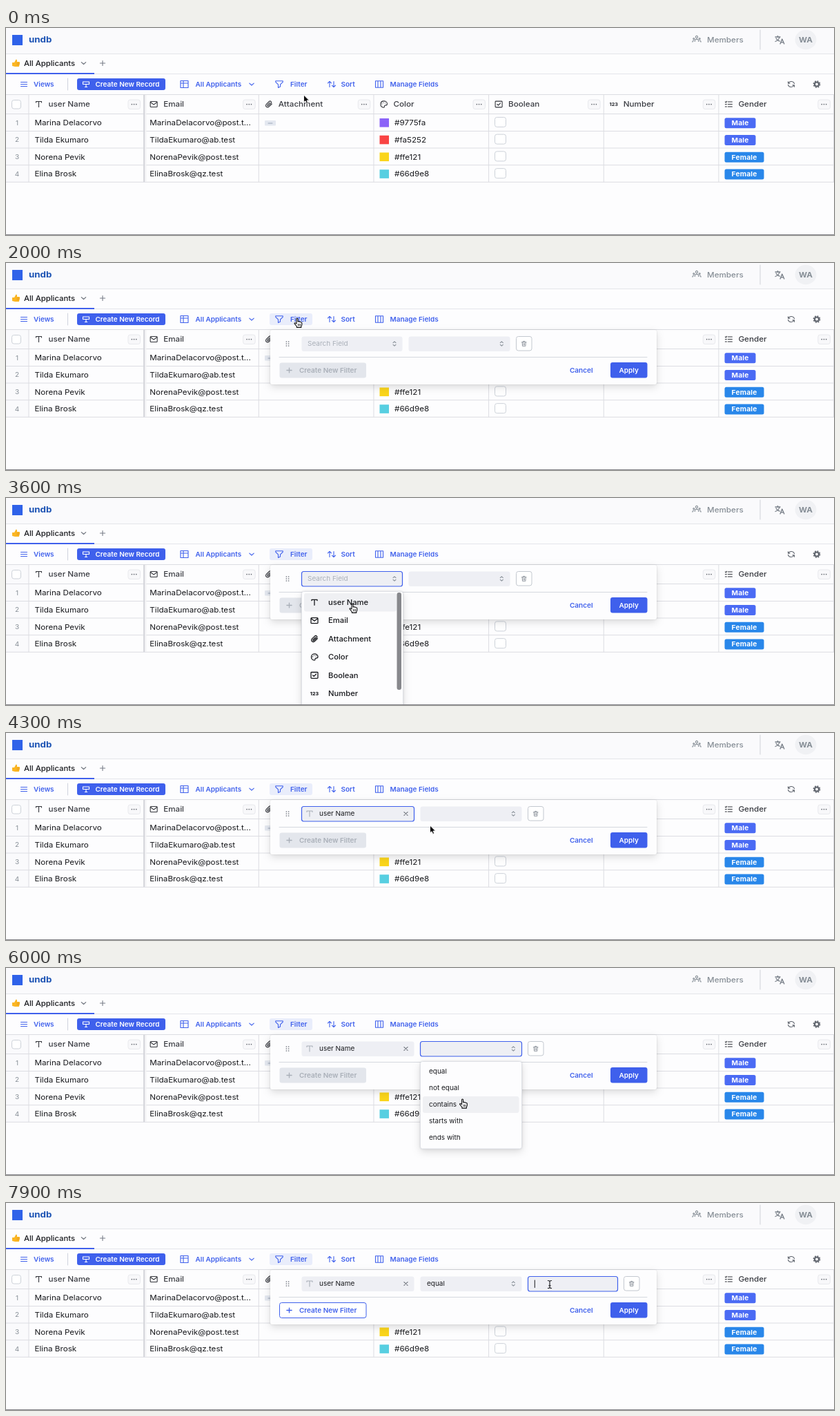
These frames come from a looping animation (1200 by 300 pixels, 8 s). An HTML page:

```html
<!DOCTYPE html>
<html lang="en">
<head>
<meta charset="utf-8">
<title>Filtering a table</title>
<style>
  html, body { margin: 0; width: 100%; height: 100%; overflow: hidden; background: #fdfdfe; }
  svg { display: block; width: 1200px; height: 300px; }
  text { font-family: Inter, Roboto, sans-serif; white-space: pre; }
  .panel { filter: drop-shadow(0 4px 6px rgba(0, 0, 0, .13)) drop-shadow(0 0 1px rgba(0, 0, 0, .12)); }
</style>
</head>
<body>
<svg viewBox="0 0 1200 300">
  <g id="page"></g>
  <g id="overlay"></g>
  <path d="M0 299.5H1200" stroke="#85858a"/>
  <g id="cursor"></g>
</svg>
<script>
const INK = '#17181c', BLUE = '#3f60ec', GRAY = '#868e96', PALE = '#a9afb8', LINE = '#dcdde2', FIELD = '#eeeff4';
const LOOP = 8000, STEP = 100;

// The interface is slightly wider than tall, so all type shares one scale.
const text = (x, y, str, size = 14, weight = 400, fill = INK, anchor = 'start', spacing = 0) =>
  `<text transform="translate(${x} ${y + size * .28}) scale(.8333 .772)" font-size="${size}" font-weight="${weight}" fill="${fill}" text-anchor="${anchor}" letter-spacing="${spacing}">${str}</text>`;
const rect = (x, y, w, h, fill, rx = 0, stroke = 'none', extra = '') =>
  `<rect x="${x}" y="${y}" width="${w}" height="${h}" fill="${fill}" rx="${rx}" stroke="${stroke}" ${extra}/>`;
const line = (d, color = LINE, width = 1) =>
  `<path d="${d}" fill="none" stroke="${color}" stroke-width="${width}" stroke-linecap="round" stroke-linejoin="round"/>`;
const dot = (x, y, r, fill) => `<circle cx="${x}" cy="${y}" r="${r}" fill="${fill}"/>`;

const ICONS = {
  text: 'M-4-2.6V-4H4V-2.6M0-4V4',
  mail: 'M-4-4H4Q5-4 5-3V3Q5 4 4 4H-4Q-5 4-5 3V-3Q-5-4-4-4M-4.6-3L0 .6 4.6-3',
  clip: 'M4.5-.5L.5 3.4C-2.4 6-6 2.5-3.4-.2L.6-4C2.5-5.6 5-3.2 3.2-1.4L-.6 2.2C-1.7 3-2.7 1.7-1.8 .9L1.6-2.2',
  palette: 'M0-4.6C-6-4.6-6 4.6 0 4.6C2 4.6 0 2 2 1.6C4 1.4 5 1.6 5-.6C5-3 2.5-4.6 0-4.6M-2.6-.6V-.5M-.6-2.4V-2.3M2.2-1.8V-1.7',
  check: 'M-4-4.4H4Q5-4.4 5-3.6V3.6Q5 4.4 4 4.4H-4Q-5 4.4-5 3.6V-3.6Q-5-4.4-4-4.4M-2.3 0L-.6 1.5 2.4-1.6',
  list: 'M-1-3.5H5M-1 0H5M-1 3.5H5M-5-3.5L-4-2.6-2.8-4.2M-5 0H-3M-5 3.5H-3',
  menu: 'M-4.5-3H4.5M-4.5 0H4.5M-4.5 3H4.5',
  table: 'M-5.5-5H5.5V5H-5.5ZM-5.5-1.5H5.5M-1.5-5V5',
  columns: 'M-5.5-4.8H5.5V4.8H-5.5ZM-2-4.8V4.8M2-4.8V4.8',
  filter: 'M-5.2-4.8H5.2V-3.2L1.5.4V3.6L-1.5 5V.4L-5.2-3.2Z',
  sort: 'M-3 4V-4M-5.6-1.6L-3-4.2-.4-1.6M3-4V4M.4 1.6L3 4.2 5.6 1.6',
  down: 'M-3.2-1.3L0 1.5 3.2-1.3',
  updown: 'M-2-1.4L0-3.2 2-1.4M-2 1.4L0 3.2 2 1.4',
  plus: 'M-3.6 0H3.6M0-3.4V3.4',
  close: 'M-2.6-2.4L2.6 2.4M2.6-2.4L-2.6 2.4',
  form: 'M-4.5-3.5H4.5V0H-4.5ZM0 0V4M-1.6 4H1.6',
  refresh: 'M4.5-.8A4.6 4.2 0 0 0-4-1.8M-4.5-3.8V-1.4H-2M-4.5.8A4.6 4.2 0 0 0 4 1.8M4.5 3.8V1.4H2',
  trash: 'M-3.3-2.2H3.3M-2.6-2.2L-2.2 3.4H2.2L2.6-2.2M-1.2-2.2V-3.6H1.2V-2.2M-.8-.4V1.8M.8-.4V1.8',
  translate: 'M-6-4H1M-2.5-5.5V-4M0-4C-.5-1-3 1.5-6 2.5M-5-2C-4 0-2 1.5 0 2M1 6L3.8-1 6.8 6M2 3.8H5.8',
  people: 'M-1.6-3A1.6 1.6 0 1 0 1.6-3A1.6 1.6 0 1 0-1.6-3M-2.6 3.4V2A2 2 0 0 1-.6.4H.6A2 2 0 0 1 2.6 2V3.4M-5.2-.4A1 1 0 1 0-3.2-.4A1 1 0 1 0-5.2-.4M3.2-.4A1 1 0 1 0 5.2-.4A1 1 0 1 0 3.2-.4M-6 4.2V3.2L-4.4 2.2M6 4.2V3.2L4.4 2.2'
};
const icon = (name, x, y, color = '#33353b', width = 1.1) => name === 'number'
  ? text(x, y, '123', 8.5, 800, color, 'middle')
  : `<g transform="translate(${x} ${y})">${line(ICONS[name], color, width)}</g>`;

const FIELDS = [['text', 'user Name'], ['mail', 'Email'], ['clip', 'Attachment'], ['palette', 'Color'],
  ['check', 'Boolean'], ['number', 'Number'], ['list', 'Gender']];
const ROWS = [
  ['Marina Delacorvo', 'MarinaDelacorvo@post.t...', '#9775fa', '#8b63f8', 'Male'],
  ['Tilda Ekumaro', 'TildaEkumaro@ab.test', '#fa5252', '#f94444', 'Male'],
  ['Norena Pevik', 'NorenaPevik@post.test', '#ffe121', '#fad51b', 'Female'],
  ['Elina Brosk', 'ElinaBrosk@qz.test', '#66d9e8', '#57cfe1', 'Female']
];
const OPERATORS = ['equal', 'not equal', 'contains', 'starts with', 'ends with'];
const colX = i => 33 + i * 166.65;

function drawTopBars() {
  return rect(0, 0, 1200, 37, '#fafafc') + line('M0 37.5H1200M0 66.5H1200', '#e4e5ea') +
    rect(9, 10, 15, 15, '#2f62e9') + text(33, 17, 'undb', 16, 700, '#1c53b4') +
    icon('people', 1001, 16, GRAY) + text(1016, 17, 'Members', 14, 500, GRAY) +
    line('M1093 3V31', '#cfd2d8') + icon('translate', 1121, 17, '#747b84', 1.3) +
    '<ellipse cx="1159" cy="17" rx="15.5" ry="14.2" fill="#f0f1f4"/>' + text(1159, 17, 'WA', 14, 700, GRAY, 'middle') +
    '<path d="M9 50H12L14.5 45.5Q16.5 45.5 16 49H19.5Q20.5 50 19.8 52L18.8 56H13L9 55Z" fill="#fbb623"/>' +
    line('M16 51H19.6M15.8 53H19.2', '#d98a12', .6) +
    text(26, 51, 'All Applicants', 13.6, 500) + icon('down', 112.5, 51, '#666b75') +
    icon('plus', 140, 51, '#777c86') + rect(0, 65, 128, 2, BLUE);
}

function drawToolbar() {
  const label = (x, str, fill = BLUE) => text(x, 81.5, str, 12, 600, fill);
  return icon('menu', 26, 81.5, BLUE) + label(40, 'Views') + line('M89.5 73V90', '#cfd3de') +
    rect(103, 73, 128, 17, BLUE, 3) + icon('form', 116, 81.5, '#fff') + label(129.5, 'Create New Record', '#fff') +
    icon('table', 258.5, 81.5, BLUE) + label(274.5, 'All Applicants') + icon('down', 356, 81.5, BLUE) +
    icon('filter', 396, 81.5, BLUE) + label(412, 'Filter') +
    icon('sort', 472, 81.5, BLUE) + label(485.5, 'Sort') +
    icon('columns', 541, 81.5, BLUE) + label(556.5, 'Manage Fields') +
    icon('refresh', 1138, 81.5, '#60656e') +
    '<g fill="none" stroke="#60656e"><circle cx="1175" cy="81.5" r="3" stroke-width="2.2"/><circle cx="1175" cy="81.5" r="4.6" stroke-width="1.6" stroke-dasharray="1.9 1.71"/></g>';
}

function drawTable() {
  let out = rect(0, 97, 33, 126, '#fafafc');
  const rules = [96.5, 124.5, 149.5, 174, 198.7, 223.3].map(y => `M0 ${y}H1200`);
  const columns = [0, 1, 2, 3, 4, 5, 6, 7].map(i => `M${Math.min(colX(i), 1199.5)} 97V223`);
  out += line(rules.concat(columns).join('')) + rect(199.4, 97, 2, 126, '#d3d4d9') + rect(201.4, 97, 2, 126, '#f3f3f6');
  out += rect(8.5, 104.5, 13, 12.5, '#fff', 3, '#cdd2d9');
  FIELDS.forEach(([kind, name], i) => {
    const x = colX(i);
    out += icon(kind, x + 14.5, 110.5) + text(x + 28.5, 110.5, name, 14, 500, '#3a3c42');
    out += rect(x + 144, 104, 17.5, 13.5, '#f8f8fa', 3, '#e8e9ed');
    [-3.2, 0, 3.2].forEach(dx => out += dot(x + 152.6 + dx, 110.6, .85, '#63676f'));
  });
  ROWS.forEach(([name, email, hex, swatch, gender], i) => {
    const y = 137.2 + i * 24.75;
    const male = gender === 'Male', width = male ? 45 : 57;
    out += text(16, y, i + 1, 12, 400, GRAY, 'middle') + text(41.5, y, name) + text(208.3, y, email) +
      rect(541.5, y - 6.2, 13.5, 12.6, swatch) + text(563, y, hex) +
      rect(708.5, y - 7.8, 16, 14, '#fff', 3, '#cdd2d9') +
      rect(1041.5, y - 7, width, 15, male ? '#4b6bf4' : '#2987ea', 2.5) +
      text(1041.5 + width / 2, y + .6, gender, 12.2, 700, '#fff', 'middle', .25);
  });
  return out + rect(375, 134, 16, 7.5, '#e4e8f0', 1) + line('M380 138H386', '#9aa5b8');
}

const select = (x, w, focused) => rect(x + .5, 106.5, w - 1, 21.5, FIELD, 3, focused ? BLUE : 'none', 'stroke-width="1.2"');
const trash = x => rect(x + .5, 106.5, 22.5, 20.5, '#fff', 3, '#c3c8cf') + icon('trash', x + 11.7, 117, '#8c929b', .9);

function drawPopover(s) {
  let out = rect(383, 97, 560, 79, '#fdfdfe', 3, 'none', 'class="panel"');
  for (const dx of [-1.6, 1.6]) for (const dy of [-3, 0, 3]) out += dot(408 + dx, 117 + dy, .85, '#70757e');
  out += line('M396 136.5H929', '#d5d8de');
  out += select(428, s.chosen ? 164 : 147, s.fieldFocus);
  if (s.chosen) {
    out += icon('text', 440, 117, PALE) + text(454, 117, 'user Name', 12) + icon('close', 579.5, 117, '#6c717a');
  } else {
    out += text(437, 117, 'Search Field', 12, 400, PALE) + icon('updown', 563, 117, GRAY);
  }
  const opX = s.chosen ? 600 : 583;
  out += select(opX, 148, s.opMenu) + icon('updown', opX + 135.3, 117, GRAY);
  if (s.done) {
    out += text(610, 117, 'equal', 12) + select(756, 131, s.inputFocus);
    if (s.inputFocus) out += line('M766.3 112V122.5', INK);
  }
  out += trash(s.done ? 895 : opX + 156);
  const action = s.done ? BLUE : PALE;
  out += rect(396.5, 144.5, 125.5, 22, s.done ? '#fff' : '#e3e6ec', 3, s.done ? BLUE : 'none') +
    icon('plus', 410.5, 155.5, action, 1.3) + text(425, 155.5, 'Create New Filter', 12, 600, action) +
    text(817, 155.5, 'Cancel', 12, 600, BLUE) + rect(876, 144, 53.5, 22.5, BLUE, 3) +
    text(902.7, 155.5, 'Apply', 12, 600, '#fff', 'middle');
  return out;
}

function drawFieldMenu(y) {
  let out = rect(428.5, 135.5, 147, 175, '#fdfdfe', 3, '#dfe1e6', 'class="panel"');
  const hover = Math.floor((y - 138) / 26.4);
  FIELDS.slice(0, 6).forEach(([kind, name], i) => {
    const rowY = 151.3 + i * 26.4;
    if (i === hover) out += rect(432, rowY - 13.2, 134, 26.4, '#eff0f3', 3);
    out += icon(kind, 447, rowY, INK, 1.3) + text(467, rowY, name, 13.5, 500);
  });
  return out + rect(566.5, 137, 6.5, 141, '#87888c', 3);
}

function drawOperatorMenu(y) {
  let out = rect(600.5, 135.5, 147, 126.5, '#fdfdfe', 3, '#dfe1e6', 'class="panel"');
  const hover = Math.floor((y - 138) / 24);
  OPERATORS.forEach((name, i) => {
    const rowY = 150 + i * 24;
    if (i === hover) out += rect(604, rowY - 12, 139.5, 24, '#eff0f3', 3);
    out += text(613, rowY, name, 12);
  });
  return out;
}

// time, x, y of the pointer tip
const PATH = [[0, 431.5, 97], [100, 428, 86], [300, 422, 80], [2000, 422, 80], [2500, 500, 113], [2900, 500, 113],
  [3400, 502, 153], [3800, 502, 153], [4300, 614.5, 134], [4600, 660, 113], [4900, 660, 116], [5500, 664, 209],
  [5800, 664, 213], [6300, 657, 147], [6600, 657, 147], [7400, 788, 118], [8000, 788, 118]];
const KINDS = [[0, 'arrow'], [300, 'hand'], [2200, 'arrow'], [2500, 'hand'], [3900, 'arrow'], [4600, 'hand'],
  [6600, 'arrow'], [7400, 'beam']];
const POINTERS = {
  arrow: '<path d="M0 0V10.8L2.5 8.7 4.2 12.4 6.2 11.6 4.6 8H8Z" fill="#0b0b0d" stroke="#fff" stroke-width=".9"/>',
  hand: '<path d="M-1 1Q0-.6 1 1V5Q2.2 4.2 3 5.2Q4.2 4.6 5 5.8Q6.6 5.4 6.8 7V9.6Q6.4 11 5.8 12V13.4H-.6V12L-4 7.6Q-3.6 5.8-1 8Z" fill="#fff" stroke="#0b0b0d" stroke-width="1.1" stroke-linejoin="round"/>' +
    line('M1.4 8.4V11M3 8.4V11M4.6 8.4V11', '#0b0b0d', .7),
  beam: line('M-2.6-5.5Q0-5.5 0-4Q0-5.5 2.6-5.5M0-4V4M-2.6 5.5Q0 5.5 0 4Q0 5.5 2.6 5.5M-1.3 1.8H1.3', INK, 1.1)
};

function pointerAt(t) {
  const next = PATH.findIndex(p => p[0] > t);
  const [t0, x0, y0] = PATH[next - 1], [t1, x1, y1] = PATH[next];
  const u = (t - t0) / (t1 - t0), ease = u * u * (3 - 2 * u);
  return { x: x0 + (x1 - x0) * ease, y: y0 + (y1 - y0) * ease, kind: KINDS.filter(k => k[0] <= t).pop()[1] };
}

const page = document.getElementById('page');
const overlay = document.getElementById('overlay');
const cursor = document.getElementById('cursor');
page.innerHTML = drawTopBars() + rect(382, 73, 62, 17, '#e9edfb', 3, 'none', 'id="active"') + drawToolbar() + drawTable();
const active = document.getElementById('active');

function render(t) {
  const pointer = pointerAt(t);
  const between = (from, to) => t >= from && t < to;
  const state = {
    chosen: t >= 3800, done: t >= 6600, fieldFocus: between(2600, 4700),
    opMenu: between(4700, 6600), inputFocus: t >= 7500
  };
  active.style.display = t >= 300 ? '' : 'none';
  overlay.innerHTML = (t >= 600 ? drawPopover(state) : '') +
    (between(2600, 3800) ? drawFieldMenu(pointer.y) : '') +
    (state.opMenu ? drawOperatorMenu(pointer.y) : '');
  cursor.innerHTML = POINTERS[pointer.kind];
  cursor.setAttribute('transform', `translate(${pointer.x} ${pointer.y})`);
}

let shown = -1;
const start = performance.now();
function tick() {
  const t = Math.floor((performance.now() - start) % LOOP / STEP) * STEP;
  if (t !== shown) render(shown = t);
  requestAnimationFrame(tick);
}
tick();
</script>
</body>
</html>
```
